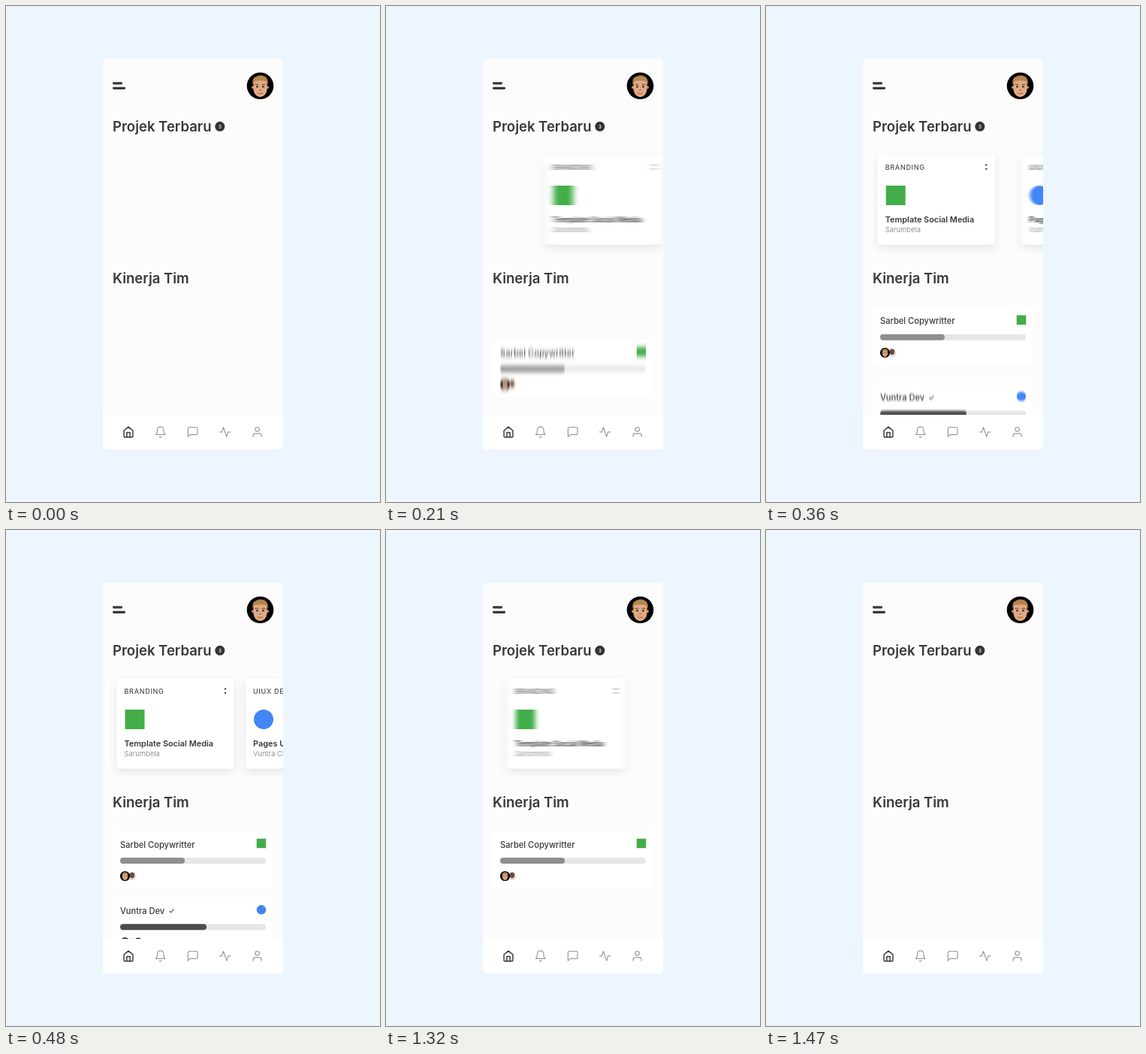
These frames come from a looping animation (498 by 660 pixels, 2550 ms). An HTML page:

```html
<!DOCTYPE html>
<html lang="id">
<head>
<meta charset="utf-8">
<style>
  html, body { margin: 0; height: 100%; overflow: hidden; background: #edf6ff; }
  svg { display: block; font-family: Inter, sans-serif; fill: #383838; }
  .heading { font-size: 18.5px; font-weight: 600; }
  .tag { font-size: 9px; font-weight: 500; letter-spacing: .7px; fill: #4c4c4c; }
  .title { font-size: 10.9px; font-weight: 600; }
  .client { font-size: 9.4px; fill: #929292; }
  .task { font-size: 11.1px; font-weight: 500; }
  .shadow { filter: drop-shadow(0 4px 6px rgba(0, 0, 0, .09)); }
  .icon { fill: none; stroke: #999; stroke-width: 1.7; stroke-linecap: round; stroke-linejoin: round; }
  .active { stroke: #333; stroke-width: 2; }
</style>
</head>
<body>
<svg id="stage" width="498" height="660" viewBox="0 0 498 660"></svg>
<script>
const GREEN = '#42ad49', BLUE = '#4285f4';

const rect = (x, y, w, h, fill, r = 0, cls = '') =>
  `<rect x="${x}" y="${y}" width="${w}" height="${h}" rx="${r}" fill="${fill}" class="${cls}"/>`;
const circle = (x, y, r, fill) => `<circle cx="${x}" cy="${y}" r="${r}" fill="${fill}"/>`;
const text = (x, y, cls, str) => `<text x="${x}" y="${y}" class="${cls}">${str}</text>`;
const icon = (x, d, cls = '') =>
  `<path class="icon ${cls}" transform="translate(${x} 566.8) scale(.7) translate(-12 -12)" d="${d}"/>`;
const logo = (x, y, size, color) => color === GREEN
  ? rect(x - size / 2, y - size / 2, size, size, color)
  : circle(x, y, size / 2, color);

const avatar = (x, y, scale) => `<g transform="translate(${x} ${y}) scale(${scale})">
  ${circle(0, 0, 17.8, '#000')}
  ${circle(-9.5, 2, 2, '#c98d68')}${circle(9.5, 2, 2, '#c98d68')}
  <path fill="#e2aa83" d="M-9-6Q0-11 9-6V5Q8 14 0 15Q-8 14-9 5Z"/>
  <path fill="#b5854f" d="M-10-1Q-11-11-6-12Q0-16 7-12Q11-9 10-1L8-6Q0-8-8-6Z"/>
  <path fill="none" stroke="#8a5c38" stroke-width="1.2" d="M-7-1.5Q-5-3-2-1.5M2-1.5Q5-3 7-1.5"/>
  ${circle(-4, 1, 1.5, '#3f4650')}${circle(4, 1, 1.5, '#3f4650')}
  <path fill="none" stroke="#b8715a" stroke-width="1.4" d="M-1.5 5.5H1.5M-3.5 9.5Q0 11 3.5 9.5"/>
</g>`;

const member = x => circle(x, 460.5, 5.6, '#e4dfdc') +
  `<path fill="#6b4a3c" d="M${x - 3} 457q3-3 6 0v4q-3 5-6 0z"/>`;

const projectCard = (x, tag, title, client, color) =>
  rect(x, 198, 156, 119.5, '#fff', 4, 'shadow') +
  text(x + 10, 217.5, 'tag', tag) +
  circle(x + 144.5, 211.5, 1.3, '#555') + circle(x + 144.5, 216.7, 1.3, '#555') +
  logo(x + 24, 252, 26, color) +
  text(x + 10, 288, 'title', title) +
  text(x + 10, 301.3, 'client', client);

const taskCard = (name, color, done, shade, extra = '') =>
  rect(142, 401, 214, 75, '#fff', 4) +
  text(152, 422.7, 'task', name) +
  logo(340, 417, 12.5, color) +
  rect(152, 436, 194, 8, '#e6e6e6', 4) + rect(152, 436, done, 8, shade, 4) +
  member(168) + avatar(158.5, 460.5, .37) + extra;

const check = '<path fill="none" stroke="#555" stroke-width="1.2" d="M217.5 418.5l2 2 4-4.5"/>';

// Each part slides by `dist` along its axis, after resting at (0, y).
const parts = [
  { axis: 'x', dist: 222, y: 0, enter: 80, leave: 1272, time: 190,
    art: projectCard(147.5, 'BRANDING', 'Template Social Media', 'Sarumbela', GREEN) },
  { axis: 'x', dist: 222, y: 0, enter: 165, leave: 1200, time: 180,
    art: projectCard(319, 'UIUX DESIGN', 'Pages UIUX', 'Vuntra Cloud', BLUE) },
  { axis: 'y', dist: 148, y: 0, enter: 80, leave: 1320, time: 150,
    art: taskCard('Sarbel Copywritter', GREEN, 86, '#8e8e8e') },
  { axis: 'y', dist: 148, y: 88.3, enter: 165, leave: 1200, time: 180,
    art: taskCard('Vuntra Dev', BLUE, 115, '#4d4d4d', check + avatar(176, 460.5, .34)) },
];

const stage = document.getElementById('stage');
stage.innerHTML = `<defs>
    <clipPath id="panel"><rect x="129" y="70" width="240" height="474"/></clipPath>
    ${parts.map((p, i) => `<filter id="blur${i}" filterUnits="userSpaceOnUse" x="100" y="150" width="700" height="600"
      color-interpolation-filters="sRGB"><feGaussianBlur stdDeviation="0"/></filter>`).join('')}
  </defs>
  ${rect(129, 70, 240, 520, '#fcfcfc', 6)}
  ${rect(142, 101.3, 13, 3.2, '#383838', 1.4)}${rect(142, 107.8, 17, 3.2, '#383838', 1.4)}
  ${avatar(338.5, 106.3, 1)}
  ${text(142, 167, 'heading', 'Projek Terbaru')}
  ${circle(284.8, 160.3, 6.5, '#333')}
  <text x="284.8" y="162.5" font-size="6" font-weight="600" text-anchor="middle" fill="#fff">3</text>
  ${text(142, 369.3, 'heading', 'Kinerja Tim')}
  <g clip-path="url(#panel)">${parts.map(p => `<g><g class="part">${p.art}</g></g>`).join('')}</g>
  <path fill="#fff" d="M129 544h240v40q0 6-6 6H135q-6 0-6-6z"/>
  ${icon(163, 'M3.5 9.5L12 2.5l8.5 7V20a2 2 0 0 1-2 2h-13a2 2 0 0 1-2-2zM9 22v-9h6v9', 'active')}
  ${icon(205.7, 'M18 8A6 6 0 0 0 6 8c0 7-3 9-3 9h18s-3-2-3-9M13.73 21a2 2 0 0 1-3.46 0')}
  ${icon(248.7, 'M21 15a2 2 0 0 1-2 2H7l-4 4V5a2 2 0 0 1 2-2h14a2 2 0 0 1 2 2z')}
  ${icon(291.6, 'M22 12h-4l-3 9L9 3l-3 9H2')}
  ${icon(334.6, 'M20 21v-2a4 4 0 0 0-4-4H8a4 4 0 0 0-4 4v2M16 7a4 4 0 1 1-8 0a4 4 0 1 1 8 0')}`;

const groups = stage.querySelectorAll('.part');
const blurs = stage.querySelectorAll('feGaussianBlur');
const clamp = u => Math.min(1, Math.max(0, u));

// cubic-bezier(.25, .1, .25, 1)
function ease(u) {
  let lo = 0, hi = 1;
  for (let i = 0; i < 24; i++) {
    const s = (lo + hi) / 2;
    if (.75 * s * (1 - s) + s ** 3 < u) lo = s; else hi = s;
  }
  return .3 * lo * (1 - lo) ** 2 + 3 * lo ** 2 * (1 - lo) + lo ** 3;
}

function offset(part, t) {
  const away = t < 900
    ? 1 - ease(clamp((t - part.enter) / 310))
    : clamp((t - part.leave) / part.time) ** 2;
  return part.dist * (away > .9995 ? 1 : away < .0005 ? 0 : away);
}

function draw(now) {
  const t = Math.floor(now % 2550 / 30) * 30;
  parts.forEach((part, i) => {
    const shift = offset(part, t);
    const speed = Math.abs(offset(part, t + 5) - offset(part, t - 5)) / 10;
    const blur = Math.min(4, 5 * speed);
    const horizontal = part.axis === 'x';
    const group = groups[i];
    group.parentNode.setAttribute('visibility', shift < part.dist ? 'visible' : 'hidden');
    group.setAttribute('transform', `translate(${horizontal ? shift : 0} ${part.y + (horizontal ? 0 : shift)})`);
    blurs[i].setAttribute('stdDeviation', horizontal ? `${blur} 0` : `0 ${blur}`);
    if (blur > .2) group.setAttribute('filter', `url(#blur${i})`);
    else group.removeAttribute('filter');
  });
}

const start = performance.now();
function tick() {
  draw(performance.now() - start);
  requestAnimationFrame(tick);
}
tick();
</script>
</body>
</html>
```
